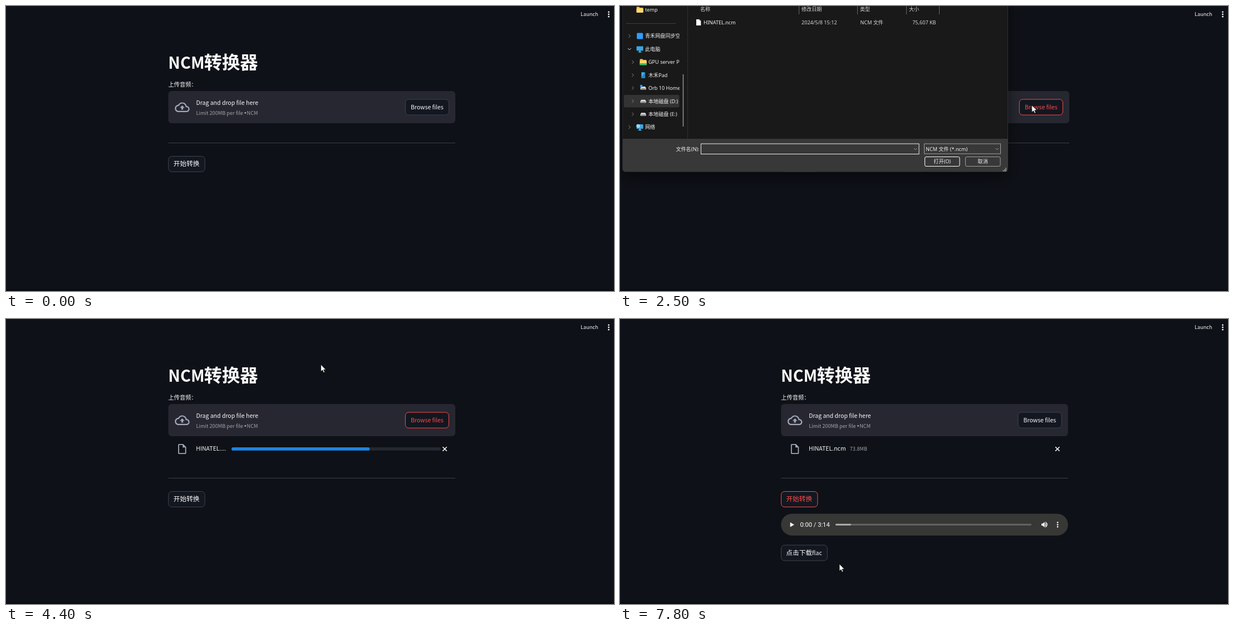
Animation, 1092 px wide and 513 px high, one loop 8 s. Source, as an HTML page:

```html
<!DOCTYPE html>
<html lang="zh-CN">
<head>
<meta charset="utf-8">
<title>NCM转换器</title>
<style>
  html, body { margin: 0; width: 100%; height: 100%; overflow: hidden; background: #0e1117; }
  svg { display: block; }
  text { font: 10.5px "Noto Sans CJK SC", sans-serif; fill: #fafafa; white-space: pre; }
  .title { font-weight: 700; font-size: 32.27px; }
  .title .latin { font-size: 28.9px; }
  .cjk { font-size: 11.73px; }
  .label { font-size: 10.27px; }
  .small { font-size: 9.19px; }
  .muted { fill: #a3a4a9; }
  .icon { fill: #a3a8b8; }
  .button rect { fill: #131720; stroke: #41444c; }
  .button.red rect { stroke: #ff4b4b; }
  .button.red text { fill: #ff4b4b; }
  .button.pressed rect { fill: #ff4b4b; stroke: #ff4b4b; }
  .button.pressed text { fill: #fafafa; }
  #player text { font: 11.2px Roboto, sans-serif; fill: #fff; }
  #dialog text { font: 9.1px "Noto Sans", "Noto Sans CJK SC", sans-serif; fill: #f2f2f2; }
  #dialog .dim { fill: #d8d8d8; }
  .line { fill: none; stroke: #a0a0a0; }
  .hidden { display: none; }
</style>
</head>
<body>
<svg width="1092" height="513" viewBox="0 0 1092 513">
  <defs>
    <filter id="shadow" filterUnits="userSpaceOnUse" x="-60" y="-120" width="850" height="500">
      <feDropShadow dx="0" dy="10" stdDeviation="13" flood-color="#000" flood-opacity=".5"/>
    </filter>
    <clipPath id="sidebar"><rect x="5" y="0" width="102" height="239"/></clipPath>
  </defs>
  <rect width="1092" height="513" fill="#0e1117"/>
  <rect y="510" width="1092" height="3" fill="#0a0c11"/>
  <text class="small" x="1032" y="18.3">Launch</text>
  <g fill="#fafafa"><circle cx="1082.5" cy="10.8" r="1.4"/><circle cx="1082.5" cy="15" r="1.4"/><circle cx="1082.5" cy="19.2" r="1.4"/></g>
  <g id="runner" fill="none" stroke="#c8c9cc" stroke-width="1.8" stroke-linecap="round" stroke-linejoin="round">
    <circle cx="1006" cy="8.5" r="1.2"/>
    <path id="limbs"/>
  </g>

  <g id="page">
    <text class="title" y="112.5"><tspan class="latin" x="291.3">NCM</tspan><tspan x="355.8">转换器</tspan></text>
    <text class="label" x="291.5" y="145.3">上传音频：</text>
    <rect x="291.5" y="153" width="515.5" height="58" rx="5.9" fill="#262730"/>
    <path class="icon" transform="translate(303.3 169) scale(1.1)" d="M19.35 10.04C18.67 6.59 15.64 4 12 4 9.11 4 6.6 5.64 5.35 8.04 2.34 8.36 0 10.91 0 14c0 3.31 2.69 6 6 6h13c2.76 0 5-2.24 5-5 0-2.64-2.05-4.78-4.65-4.96zM19 18H6c-2.21 0-4-1.79-4-4 0-2.05 1.53-3.76 3.56-3.97l1.07-.11.5-.95C8.08 7.14 9.94 6 12 6c2.62 0 4.88 1.86 5.39 4.43l.3 1.5 1.53.11c1.56.1 2.78 1.41 2.78 2.96 0 1.65-1.35 3-3 3zM8 13h2.55v3h2.9v-3H16l-4-4z"/>
    <text x="341.5" y="178">Drag and drop file here</text>
    <text class="small muted" y="195.5"><tspan x="341.5">Limit 200MB per file</tspan><tspan x="432.5">NCM</tspan></text>
    <circle cx="429.8" cy="192.2" r="1.5" class="muted"/>
    <g id="browse" class="button">
      <rect x="717.3" y="168" width="78" height="28.2" rx="5.9"/>
      <text x="726.9" y="186">Browse files</text>
    </g>

    <g id="file">
      <path class="icon" transform="translate(305.6 223.2) scale(.9)" d="M14 2H6c-1.1 0-2 .9-2 2v16c0 1.1.9 2 2 2h12c1.1 0 2-.9 2-2V8l-6-6zM6 20V4h7v5h5v11H6z"/>
      <text id="fileName" x="341.3" y="237"></text>
      <g id="progress">
        <rect x="405" y="231" width="376" height="5.8" rx="2.9" fill="#262730"/>
        <rect id="bar" x="405" y="231" height="5.8" rx="2.9" fill="#1c83e1"/>
      </g>
      <text id="fileSize" class="small muted" x="415" y="237">73.8MB</text>
      <path d="M784.3 230.2l7.4 7.4m0-7.4l-7.4 7.4" stroke="#fafafa" stroke-width="1.5"/>
    </g>

    <g id="lower">
      <path d="M291.5 246.5H807" stroke="#3d3f45"/>
      <g id="convert" class="button">
        <rect x="291.8" y="270.5" width="65.4" height="27.8" rx="5.9"/>
        <text class="cjk" x="300.7" y="288.4">开始转换</text>
      </g>
    </g>

    <g id="player">
      <rect x="291.5" y="350.4" width="515.5" height="39.4" rx="19.7" fill="#373836"/>
      <path d="M308 366l7.2 4.2-7.2 4.2z" fill="#fff"/>
      <text x="325.7" y="374">0:00 / 3:14</text>
      <rect x="389.3" y="368.7" width="352" height="2.8" rx="1.4" fill="#686967"/>
      <rect x="389.3" y="368.7" width="28" height="2.8" rx="1.4" fill="#b4b5b3"/>
      <path d="M759.3 368.3h2.4l3.2-3.1v10l-3.2-3.1h-2.4z" fill="#fff"/>
      <path d="M766.2 367.8q2 2.4 0 4.8M766.4 365.6q6 4.6 0 9.2" fill="none" stroke="#fff" stroke-width="1.2"/>
      <g fill="#fff"><circle cx="788.3" cy="366.3" r="1.3"/><circle cx="788.3" cy="370.2" r="1.3"/><circle cx="788.3" cy="374.1" r="1.3"/></g>
      <g class="button">
        <rect x="291.8" y="407" width="82.8" height="28" rx="5.9"/>
      </g>
    </g>
    <text id="download" class="cjk" y="425.4"><tspan x="300.5">点击下载</tspan><tspan x="347.4" font-size="10.5">flac</tspan></text>
  </g>

  <g id="skeleton">
    <path d="M14 -20H684.5V286q0 6-6 6H20q-6 0-6-6z" fill="#383838" filter="url(#shadow)"/>
    <path d="M14 0H684.5V235H14z" fill="#f9f9f9"/>
    <path d="M16 0H125V235H16z" fill="#191919"/>
    <path d="M119.5 10V130" stroke="#858585" stroke-width="1.5"/>
    <path d="M107 245.3h40v12h-40zM151 242.5h379.5v18.5H151zM539 242.5h133v18H539zM539 264.8h62.3v18.2H539zM609.6 264.8H672v18.2h-62.4zM672 279.3h12.5V286q0 6-6 6H672z" fill="#f9f9f9"/>
  </g>

  <g id="dialog">
    <path d="M4.5 -20H697V292.5q0 6-6 6H10.5q-6 0-6-6z" fill="#383838" filter="url(#shadow)"/>
    <path d="M5 0H696.5V239H5z" fill="#191919"/>
    <path d="M121.5 0V239M696.5 0V239" stroke="#303030"/>
    <path d="M11 31.5H101" stroke="#3d3d3d"/>
    <path d="M113.5 123V217" stroke="#949494" stroke-width="1.5"/>
    <rect x="7" y="160" width="99.5" height="22.5" rx="2" fill="#333"/>
    <g id="tree" clip-path="url(#sidebar)"></g>
    <path d="M321.5 0V15M426.5 0V15M514.5 0V15M573.5 0V15" stroke="#666"/>
    <text class="dim" y="9.3"><tspan x="144">名称</tspan><tspan x="326">修改日期</tspan><tspan x="431">类型</tspan><tspan x="519">大小</tspan></text>
    <rect id="row" x="133.5" y="20.5" width="436.5" height="18.5"/>
    <path d="M137 24h5.5l2.8 2.8V35H137z" fill="#fff"/>
    <path d="M142.5 24v2.8h2.8" fill="none" stroke="#999" stroke-width=".7"/>
    <text x="150" y="33">HINATEL.ncm</text>
    <text class="dim" y="33"><tspan x="326">2024/5/8 15:12</tspan><tspan x="431.5">NCM 文件</tspan></text>
    <text class="dim" x="567.5" y="33" text-anchor="end">75,607 KB</text>
    <text x="142.5" y="260.5" text-anchor="end">文件名(N):</text>
    <rect class="line" x="145.5" y="248" width="391.5" height="18.5" style="stroke:#eee"/>
    <rect class="line" x="546.5" y="248" width="137" height="18"/>
    <path class="line" d="M528 256l2.8 2.8 2.8-2.8M674.5 256l2.8 2.8 2.8-2.8"/>
    <text id="chosen" x="148.5" y="260.5">HINATEL.ncm</text>
    <text x="549" y="260.5">NCM 文件 (*.ncm)</text>
    <rect class="line" x="547.5" y="271.5" width="62.5" height="17" rx="2.5" style="stroke:#fff"/>
    <rect class="line" x="620.5" y="271.5" width="62.5" height="17" rx="2.5"/>
    <text x="578.7" y="283.3" text-anchor="middle">打开(O)</text>
    <text x="651.7" y="283.3" text-anchor="middle">取消</text>
    <path d="M693 291.5v6M690.7 294v3.5M688.4 296v1.5" stroke="#c8c8c8" stroke-width="1.5" stroke-dasharray="1.5 .8"/>
  </g>

  <circle id="busy" cx="758.5" cy="185" r="4.3" fill="none" stroke="#35a4e8" stroke-width="2"/>
  <g id="cursor" fill="#fff" stroke="#111" stroke-width=".8" stroke-linejoin="round">
    <path id="arrow" d="M0 0V12.6L2.9 10 5 14.4 7 13.5 5 9.2H9z"/>
    <path id="hand" d="M-1.1 1.3c0-1.7 2.6-1.7 2.6 0V5.6l5 1.1c1.4.4 1.8 1.2 1.6 2.6l-.6 4.2c-.2 1.2-.7 2.3-1.1 3.3H.6c-1-1.8-2.6-3.9-4.3-5.8-.9-1.3.6-2.4 1.6-1.6l1 1zM3.6 6.3v2M5.7 6.8v2"/>
  </g>
</svg>
<script>
const LOOP = 8000, STEP = 100;
const $ = id => document.getElementById(id);
const show = (id, on) => $(id).classList.toggle('hidden', !on);
const between = (t, from, to) => t >= from && t < to;

const folder = '<path d="M-6-4.5q0-1 1-1h3.5l1.5 1.5H5q1 0 1 1V4q0 1-1 1H-5q-1 0-1-1z" fill="#f7c64a"/><path d="M-6-2H6V4q0 1-1 1H-5q-1 0-1-1z" fill="#ffda77"/>';
const monitor = '<rect x="-6" y="-5" width="12" height="8" rx="1" fill="#35a8e8"/><path d="M-1 3h2v2h2v1h-6V5h2z" fill="#8fd0f2"/>';
const drive = '<path d="M-5 0l1.5-2.5h7L5 0V3H-5z" fill="#d9d9d9"/><path d="M-3.8 1.5h7.6" stroke="#444"/>';
const icons = {
  folder, monitor, drive,
  square: '<rect x="-5.5" y="-5.5" width="11" height="11" rx="1.5" fill="#2f9dff"/>',
  shared: folder + '<rect x="-6" y="2" width="12" height="3.5" fill="#35c26b"/>',
  tablet: '<rect x="-3.5" y="-5.5" width="7" height="11" rx="1" fill="#1f87c9"/><path d="M-2.5-4.5h5L-2.5 3z" fill="#45b4ec"/>',
  system: drive + '<rect x="-5.5" y="-5.5" width="4" height="4" fill="#2f9dff"/>',
  network: monitor + '<circle cx="-3" cy="-2" r="3.3" fill="#9ad8f5"/>'
};
// label, icon, y, indent, chevron: '>' closed, 'v' open
const rows = [
  ['temp', 'folder', 7, 0, ''], ['青禾网盘同步空间', 'square', 54, 0, '>'],
  ['此电脑', 'monitor', 77.5, 0, 'v'], ['GPU server Pool', 'shared', 101, 6, '>'],
  ['木禾Pad', 'tablet', 124.5, 6, '>'], ['Orb 10 Home', 'system', 147.5, 6, '>'],
  ['本地磁盘 (D:)', 'drive', 171.3, 6, '>'], ['本地磁盘 (E:)', 'drive', 194.7, 6, '>'],
  ['网络', 'network', 218, 0, '>']
];
const chevrons = { '': '', '>': 'm-1.5-3l3 3-3 3', v: 'm-3-1.5l3 3 3-3' };
$('tree').innerHTML = rows.map(([label, icon, y, indent, chevron]) => `
  <path d="M${17 + indent} ${y}${chevrons[chevron]}" fill="none" stroke="${chevron === 'v' ? '#ddd' : '#888'}"/>
  <g transform="translate(${35.7 + indent} ${y})">${icons[icon]}</g>
  <text x="${45 + indent}" y="${y + 3.2}">${label}</text>`).join('');

// time, x, y of the pointer's hot spot
const path = [
  [0, 1110, 22], [100, 1084, 33], [700, 710, 183], [900, 710, 183], [1200, 748, 185],
  [2400, 748, 185], [3200, 554, 37], [3900, 554, 37], [4400, 565.5, 82],
  [4800, 266, 300], [4900, 252, 312], [5600, 333, 330], [7200, 333, 330], [7800, 394, 441], [LOOP, 394, 441]
];
function pointerAt(t) {
  const i = path.findIndex(key => key[0] > t);
  const [t0, x0, y0] = path[i - 1], [t1, x1, y1] = path[i];
  const u = (t - t0) / (t1 - t0), k = u * u * (3 - 2 * u);
  return [x0 + (x1 - x0) * k, y0 + (y1 - y0) * k];
}

function render(t) {
  const [x, y] = pointerAt(t);
  const uploading = between(t, 4100, 4600), hasFile = t >= 4100, converted = t >= 6600;
  const dialogOpen = between(t, 2400, 3800);
  const inside = (left, top, right, bottom) => x > left && x < right && y > top && y < bottom;
  const overBrowse = inside(717, 168, 796, 197);
  const overConvert = hasFile && inside(291, 310, 357, 339);

  $('page').setAttribute('transform', `translate(${converted ? -2.3 : 0} 0)`);
  $('lower').setAttribute('transform', `translate(0 ${hasFile ? 40 : 0})`);
  $('browse').classList.toggle('red', t < 6000 && (overBrowse || t >= 1200));
  $('convert').classList.toggle('red', overConvert || t >= 6000);
  $('convert').classList.toggle('pressed', t === 6000);

  show('file', hasFile);
  show('progress', uploading);
  show('fileSize', hasFile && !uploading);
  $('fileName').textContent = uploading ? 'HINATEL....' : 'HINATEL.ncm';
  $('bar').setAttribute('width', 376 * Math.min(1, Math.max(0, (t - 4100) * 0.0022)));
  show('player', converted);
  show('download', converted);

  show('runner', between(t, 4700, 5200) || between(t, 6100, 6600));
  $('limbs').setAttribute('d', t % 200
    ? 'M1004 12l-3 5 4 2-1 4M1001 17l-4 2M998 13l3-2 3 1 2 3 3-1'
    : 'M1004 12l-2 5 1 3-2 3M1002 17l4 2 1 3M1000 15l4-3 3 3');

  show('skeleton', t === 2300);
  show('dialog', dialogOpen);
  const closing = t >= 3600, scale = closing ? 0.96 : 1;
  $('dialog').setAttribute('opacity', t >= 3700 ? 0.15 : closing ? 0.6 : 1);
  $('dialog').setAttribute('transform', `translate(350 60) scale(${scale}) translate(-350 -60)`);
  $('row').setAttribute('fill', t >= 3400 ? '#777' : t >= 3200 ? '#4d4d4d' : 'none');
  $('row').setAttribute('stroke', t >= 3400 ? '#9c9c9c' : 'none');
  show('chosen', t >= 3400);

  const hand = (overBrowse && t < 1800) || overConvert;
  show('busy', t === 2000);
  show('cursor', t >= 100);
  show('hand', hand);
  show('arrow', !hand);
  $('cursor').setAttribute('transform', `translate(${x} ${y})`);
}

function tick() {
  const t = performance.now() % LOOP;
  render(Math.floor(t / STEP) * STEP);
  requestAnimationFrame(tick);
}
tick();
</script>
</body>
</html>
```
